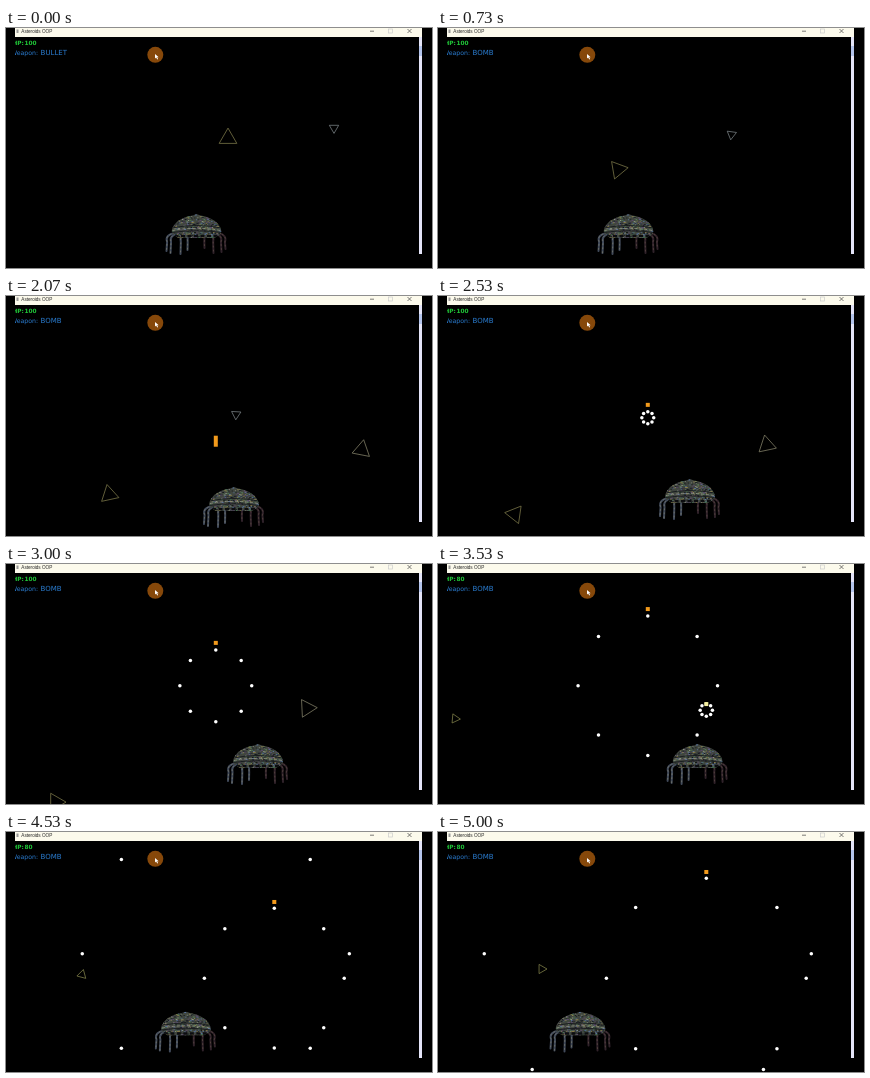
These frames come from a looping animation (426x240 px, 5070 ms). An HTML page:

```html
<!DOCTYPE html>
<html lang="en">
<head>
<meta charset="utf-8">
<title>Space shooter</title>
<style>
html, body { margin: 0; width: 100%; height: 100%; overflow: hidden; background: #000; }
svg { display: block; width: 100vw; height: 100vh; }
text { font-family: "DejaVu Sans", sans-serif; }
.title { font: 4.65px "Liberation Sans", Arial, sans-serif; fill: #222; }
</style>
</head>
<body>
<svg viewBox="0 0 426 240">
  <defs>
    <clipPath id="field"><rect x="9" y="9" width="404" height="231"/></clipPath>
    <clipPath id="hull"><path d="M-25 17C-23 8-14 3-4 1.5L0 0L4 1.5C14 3 23 8 25 17L24 20L18 24H-18L-24 20Z"/></clipPath>
  </defs>
  <rect width="426" height="240"/>
  <rect x="9" width="407" height="9" fill="#fcfaec"/>
  <rect x="413" y="9" width="3" height="217" fill="#e4e4f8"/>
  <rect x="413" y="18" width="3" height="10" fill="#b4c4ec"/>
  <rect x="10.5" y="1.5" width="2" height="3.5" fill="#999"/>
  <text class="title" x="15.3" y="4.7">Asteroids OOP</text>
  <g fill="none" stroke="#444" stroke-width=".7">
    <path d="M364 3.2h4M401.5 1l4 4m0-4l-4 4"/>
    <rect x="382.5" y="1" width="4" height="4" stroke="#ccc"/>
  </g>
  <g clip-path="url(#field)">
    <g id="rocks" fill="none" stroke-width=".75"></g>
    <g id="ship">
      <g fill="none" stroke-linecap="round" id="legs"></g>
      <g clip-path="url(#hull)">
        <rect x="-26" width="52" height="25" fill="#40463f"/>
        <g id="specks"></g>
        <path d="M-25 14Q0 9 25 14M-25 18.5Q0 15 25 18.5" fill="none" stroke="#1a1d20" stroke-width="1"/>
        <path d="M-24 16.5Q0 12 24 16.5" fill="none" stroke="#85897a" stroke-width="1" stroke-dasharray="3 2"/>
        <path d="M-22 22H22" stroke="#0c0d10" stroke-width="2.5" stroke-dasharray="4 2.5"/>
      </g>
    </g>
    <g id="shots"></g>
    <g fill="#20c838" font-size="5.8" font-weight="bold">
      <text x="6.5" y="17.2">HP:</text>
      <text x="18.5" y="17.2" id="health"></text>
    </g>
    <g fill="#2a7cd0">
      <text x="5" y="26.6" font-size="6.2">Weapon:</text>
      <text x="34.6" y="26.6" font-size="7" id="weapon"></text>
    </g>
    <circle cx="149.3" cy="26.8" r="8" fill="#86480a"/>
    <path d="M149 26v4.5l1.2-1 1 2 .9-.5-1-1.8h1.6z" fill="#fff"/>
  </g>
</svg>
<script>
const LOOP = 5070, FPS = 15;
const byId = id => document.getElementById(id);

function add(parent, tag, attrs) {
  const node = document.createElementNS("http://www.w3.org/2000/svg", tag);
  set(node, attrs);
  return parent.appendChild(node);
}
function set(node, attrs) {
  for (const key in attrs) node.setAttribute(key, attrs[key]);
}
function show(node, visible) {
  node.setAttribute("visibility", visible ? "visible" : "hidden");
}

let seed = 17;
const random = () => (seed = (seed * 16807) % 2147483647) / 2147483647;

function buildShip() {
  const tints = ["#8a937f", "#56709c", "#8d8148", "#14171a", "#46704e", "#5c4a68", "#1c2024"];
  for (const fill of tints) {
    let d = "";
    for (let i = 0; i < 60; i++) {
      const x = -25 + random() * 50, y = random() * 24, w = 0.8 + random() * 1.4;
      d += `M${x.toFixed(1)} ${y.toFixed(1)}h${w.toFixed(1)}v1h${-w.toFixed(1)}z`;
    }
    add(byId("specks"), "path", { d, fill });
  }
  const legs = [[-22, -30, 37], [-17, -26, 39], [-11, -16, 40], [-6, -9, 36],
                [6, 8, 34], [11, 17, 39], [17, 25, 38], [22, 29, 35]];
  legs.forEach(([x, foot, y], i) => {
    const left = i < 4;
    const d = `M${x} 19Q${foot * 1.06} 21 ${foot * 0.98} 28L${foot} ${y}`;
    add(byId("legs"), "path", { d, stroke: left ? "#414a5a" : "#30222a", "stroke-width": 2 });
    add(byId("legs"), "path", { d, stroke: left ? "#77786a" : "#5a4a42", "stroke-width": 0.8, "stroke-dasharray": "1 3" });
  });
}

// Positions are given at time t0; velocity in px/s and spin in deg/s.
const rocks = [
  { t0: 0, x: 222, y: 110.3, vx: -57.4, vy: 42.6, angle: 30, spin: 110, r: 10.2, color: "#807c4c", end: 3400 },
  { t0: 0, x: 328, y: 100, vx: -47.3, vy: 8.9, angle: 90, spin: 175.5, r: 5.4, color: "#7c8488", end: 2437 },
  { t0: 1530, x: 387.5, y: 159.3, vx: -58.8, vy: -10.3, angle: 47, spin: 211, r: 10.2, color: "#88866c", end: 3434 },
  { t0: 4000, x: 44.8, y: 149, vx: 58.9, vy: -12, angle: 80, spin: 160, r: 5.3, color: "#85854c", end: LOOP }
];
for (const rock of rocks) rock.node = add(byId("rocks"), "polygon", { stroke: rock.color });

const bombs = [
  { x: 209.8, y: 121.8, fired: 1600, blast: 2437, lead: () => 7 },
  { x: 268.3, y: 146.2, fired: 3200, blast: 3434, lead: age => Math.min(6.3, Math.max(0, (age - 566) / 40)) }
];
const SHOT_SPEED = 0.0638;
for (const bomb of bombs) {
  bomb.dots = Array.from({ length: 8 }, () => add(byId("shots"), "circle", { r: 1.75, fill: "#fff" }));
  bomb.core = add(byId("shots"), "rect", { width: 4 });
}

// time, centre x, top y
const shipPath = [[0, 190.5, 186], [1330, 190.5, 186], [1530, 206.5, 191], [1600, 209.8, 191],
  [1840, 209.8, 191], [2070, 228, 191], [2370, 252, 186], [2700, 252, 180], [3000, 252, 180],
  [3200, 268, 180], [3425, 268, 180], [4000, 222, 179.5], [5000, 142.5, 179.5], [LOOP, 137, 179.5]];

function shipAt(t) {
  const i = shipPath.findIndex(p => p[0] > t);
  const [t0, x0, y0] = shipPath[i - 1], [t1, x1, y1] = shipPath[i];
  const k = (t - t0) / (t1 - t0);
  return [x0 + (x1 - x0) * k, y0 + (y1 - y0) * k];
}

function drawRock(rock, t) {
  const s = (t - rock.t0) / 1000;
  const x = rock.x + rock.vx * s, y = rock.y + rock.vy * s;
  const points = [0, 120, 240].map(turn => {
    const a = (rock.angle + rock.spin * s + turn) * Math.PI / 180;
    return (x + rock.r * Math.cos(a)).toFixed(2) + "," + (y + rock.r * Math.sin(a)).toFixed(2);
  });
  set(rock.node, { points: points.join(" ") });
  show(rock.node, t < rock.end && x > -15 && x < 430);
}

function drawBomb(bomb, t) {
  const age = t - bomb.blast, radius = age * SHOT_SPEED, burst = age >= 0;
  bomb.dots.forEach((dot, i) => {
    const a = i * Math.PI / 4;
    set(dot, { cx: bomb.x + radius * Math.cos(a), cy: bomb.y + radius * Math.sin(a) });
    show(dot, burst);
  });
  const lead = burst ? bomb.lead(age) : 0;
  const height = burst ? 4 : 11;
  set(bomb.core, {
    x: bomb.x - 2, y: bomb.y - radius - lead - height / 2, height,
    fill: burst && lead < 1 ? "#f6f0a0" : "#f29a1c"
  });
  show(bomb.core, t >= bomb.fired);
}

// Time of the current picture, at 15 pictures a second on a 10 ms grid.
function pictureTime(t) {
  const start = n => Math.round(n * 100 / FPS) * 10;
  let n = Math.floor((t + 5) * FPS / 1000);
  if (start(n) > t) n--;
  return Math.min(start(n), 5000);
}

function draw(now) {
  const t = pictureTime(now % LOOP);
  const [x, y] = shipAt(t);
  set(byId("ship"), { transform: `translate(${x.toFixed(2)} ${y.toFixed(2)})` });
  rocks.forEach(rock => drawRock(rock, t));
  bombs.forEach(bomb => drawBomb(bomb, t));
  byId("health").textContent = t < 3270 ? "100" : "80";
  byId("weapon").textContent = t < 400 ? "BULLET" : "BOMB";
}

buildShip();
const begin = performance.now();
function tick() {
  draw(performance.now() - begin);
  requestAnimationFrame(tick);
}
tick();
</script>
</body>
</html>
```
